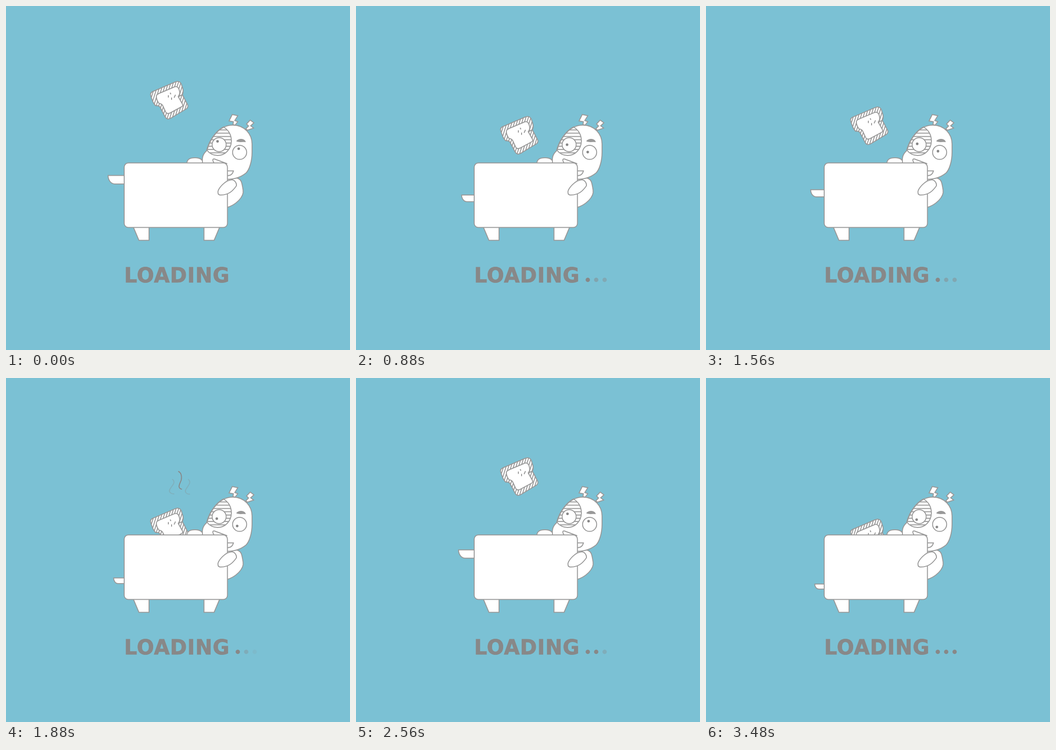
Animation of 748 by 748 pixels, one loop 4 s. Source, as an HTML page with a canvas:

```html
<!DOCTYPE html>
<html lang="en">
<head>
<meta charset="utf-8">
<title>Loading</title>
<style>
  html, body { margin: 0; width: 100%; height: 100%; overflow: hidden; background: #7bc1d4; }
  canvas { display: block; width: 100vmin; height: 100vmin; }
</style>
</head>
<body>
<canvas width="748" height="748"></canvas>
<script>
const ctx = document.querySelector('canvas').getContext('2d');
const LOOP = 4000, STEP = 40;
const BLUE = '#7bc1d4', LINE = '#999', DARK = '#888';

const shapes = {
  crust: 'M319 186 L367 165.5 C377 161 381 167 382.5 174 C386 182 386 188 383.5 193 L395 215 C396.5 219 395 221 393 223 L358 244 C352 247 349 246 346 241 L336 222 C334 217 331 216 326 217 C321 214 317 203 314.5 194 C313.5 190 315 188 319 186 Z',
  crumb: 'M333 190 L365 176.5 C372 173 376 178 377 184 C379 190 377 193 374.5 197 L383.5 213 C385 216 384 218 382 219 L357 232.5 C352 235 349 234 347 230 L341 217 C339 213 336 212 333 212 C329 207 327 202 327 197 C327 193 329 192 333 190 Z',
  specks: 'M353 194 V199 M357 188.5 L358.5 192 M360 199 V204 M368.5 193 L365.5 199.5',
  notch: 'M374.5 197 L383.5 193',
  legs: 'M277 481 L289 509.5 H311 V481 Z M430.5 481 V509.5 H452.5 L464.5 481 Z',
  farHand: 'M393 345 C393 335 397 330 411 330 C424 330 430 336 429 345 Z',
  nearHand: 'M461 406 C459 398 478 377 492 378 C498 379 502 386 501 391 C494 401 485 411 467 411 C463 411 461 409 461 406 Z',
  body: 'M478 439 C500 433 518 415 515.5 400 C513 386 513 376 501 374 L478 376 Z',
  head: 'M428 345 C425 330 428 322 437 314 C445 285 465 259 493 259 C519 259 535 279 535 300 V318 C535 338 529 356 522 363 C512 371 500 377 478 377 Z',
  patch: 'M473 263 C484 270 490 280 490 293 C490 311 477 325 460 325 C448 325 441 319 436.5 313 C442 292 456 272 473 263 Z',
  brow: 'M500.5 294 C504 288 519 286 521.5 296 C514 295 508 297.5 500.5 294 Z',
  mouth: 'M455 345 C450 339 447 332 453 332.5 L481 343 M481 358.5 H494.5 C493 365 488 369 481 369',
  antennae: 'M492 236 L504 238.5 L497.5 249 L504 251.5 L498 259 L493.5 258 L494.5 251.5 L485 250 Z M531 248 L539 254 L532 260.5 L538.5 265.5 L525 270 L521.5 267 L527.5 261 L523 256.5 Z'
};
for (const name in shapes) shapes[name] = new Path2D(shapes[name]);

const steam = [
  'M361.5 220 C374 229 351 240 356 248 Q359 252 366 252',
  'M374.5 203 C380 205 383 212 381 222 C377 232 372 239 382.5 242',
  'M396 220 C408 230 385 241 391 249 Q394 253 400 252.5'
].map(d => new Path2D(d));

const toaster = new Path2D();
toaster.roundRect(257, 341.3, 224.5, 140.2, 9);

// Keys are [time, value] pairs; 0 is the top of the toast's flight, 1 the bottom.
const toastKeys = [[0, 0], [600, 1], [1200, 0], [1280, 0], [2000, 1], [2600, 0], [2680, 0], [3400, 1]];
const landings = [600, 2000, 3400];
const dotKeys = [
  [[0, 0], [540, 1]],
  [[0, 0], [560, .35], [1200, .65], [1880, .35], [2240, 1]],
  [[0, 0], [560, 0], [1200, .85], [1880, .12], [2240, .12], [2960, .6], [3480, 1]]
];

function valueAt(keys, t) {
  const next = keys.findIndex(key => key[0] > t);
  if (next < 0) return keys[keys.length - 1][1];
  const [t0, v0] = keys[next - 1], [t1, v1] = keys[next];
  return v0 + (v1 - v0) * (t - t0) / (t1 - t0);
}

function paint(path, fill = '#fff') {
  ctx.fillStyle = fill;
  ctx.fill(path);
  ctx.stroke(path);
}

function disc(x, y, r, color, outlined) {
  const circle = new Path2D();
  circle.arc(x, y, r, 0, 7);
  ctx.fillStyle = color;
  ctx.fill(circle);
  if (outlined) ctx.stroke(circle);
}

function hatch(area, x, y, dx, dy, stepX, stepY, count) {
  ctx.save();
  ctx.clip(area);
  ctx.beginPath();
  for (let i = 0; i < count; i++) {
    ctx.moveTo(x + i * stepX, y + i * stepY);
    ctx.lineTo(x + i * stepX + dx, y + i * stepY + dy);
  }
  ctx.stroke();
  ctx.restore();
}

function drawSteam(t) {
  ctx.save();
  ctx.strokeStyle = DARK;
  steam.forEach((wisp, i) => {
    const distance = Math.min(...landings.map(end => Math.abs(t - (end - 200 + i * 80))));
    ctx.globalAlpha = Math.max(0, 1 - distance / 115);
    ctx.stroke(wisp);
  });
  ctx.restore();
}

function drawToast(drop) {
  ctx.save();
  ctx.translate(0, drop * 143);
  paint(shapes.crust);
  hatch(shapes.crust, 284, 250, 28, -90, 5.4, 0, 23);
  paint(shapes.crumb);
  ctx.stroke(shapes.notch);
  ctx.stroke(shapes.specks);
  ctx.restore();
}

function drawLever(drop) {
  const left = 222 + 14.5 * drop, top = 368.5 + 79.5 * drop, bottom = 387 + 72 * drop;
  const size = (257 - left) / 35;
  ctx.beginPath();
  ctx.moveTo(260, top);
  ctx.lineTo(left, top);
  ctx.bezierCurveTo(left, top + 10 * size, left + 6 * size, bottom, left + 15 * size, bottom);
  ctx.lineTo(260, bottom);
  ctx.fillStyle = '#fff';
  ctx.fill();
  ctx.stroke();
}

function drawCharacter(drop) {
  paint(shapes.farHand);
  paint(shapes.body);
  paint(shapes.antennae);
  paint(shapes.head);
  hatch(shapes.patch, 430, 269.5, 65, 0, 0, 7.1, 8);
  ctx.stroke(shapes.patch);
  ctx.fillStyle = LINE;
  ctx.fill(shapes.brow);
  ctx.stroke(shapes.mouth);
  disc(463.5, 301.5, 15.3, '#fff', true);
  disc(508, 318.3, 15.3, '#fff', true);
  disc(460 - 2 * drop, 294.3 + 13.7 * drop, 2.8, DARK);
  disc(506 - 4 * drop, 310.3 + 13.7 * drop, 2.8, DARK);
}

function drawCaption(t) {
  ctx.save();
  ctx.fillStyle = ctx.strokeStyle = DARK;
  ctx.lineWidth = 1;
  ctx.font = 'bold 44px "DejaVu Sans", sans-serif';
  ctx.letterSpacing = '1px';
  ctx.fillText('LOADING', 257, 600.5);
  ctx.strokeText('LOADING', 257, 600.5);
  dotKeys.forEach((keys, i) => {
    ctx.globalAlpha = valueAt(keys, t);
    disc(504 + i * 18.3, 595.5, 4.7, DARK);
  });
  ctx.restore();
}

function draw(now) {
  const t = Math.floor((now % LOOP) / STEP) * STEP;
  const drop = valueAt(toastKeys, t);
  ctx.fillStyle = BLUE;
  ctx.fillRect(0, 0, 748, 748);
  ctx.strokeStyle = LINE;
  ctx.lineWidth = 2;
  drawSteam(t);
  drawToast(drop);
  drawCharacter(drop);
  drawLever(drop);
  paint(shapes.legs);
  paint(toaster);
  paint(shapes.nearHand);
  drawCaption(t);
  requestAnimationFrame(draw);
}
draw(performance.now());
</script>
</body>
</html>
```
